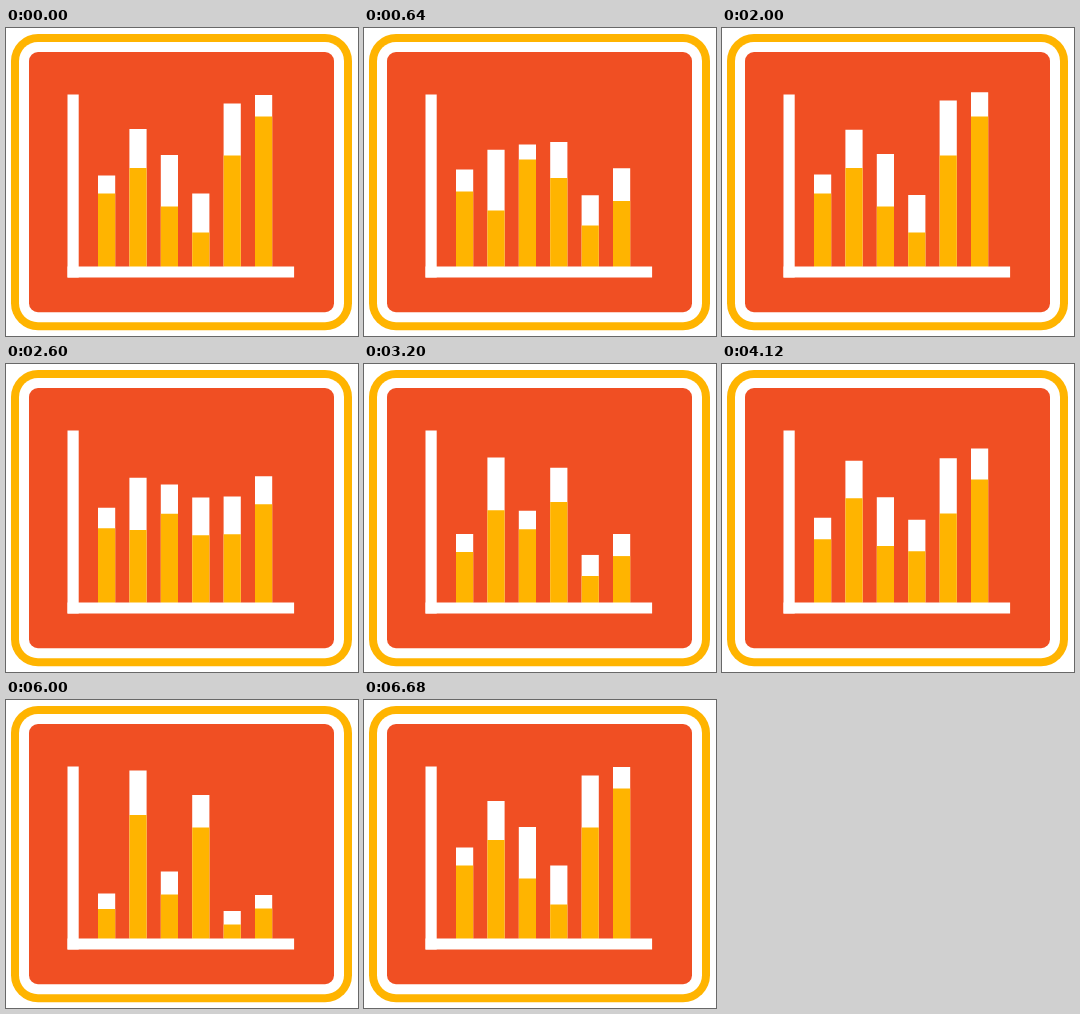
An HTML page with a canvas that plays this animation: 352 px wide and 308 px high, repeating every 6720 ms.

```html
<!DOCTYPE html>
<html lang="en">
<head>
<meta charset="utf-8">
<title>Bar chart</title>
<style>
html, body { margin: 0; width: 100%; height: 100%; overflow: hidden; background: #fff; }
canvas { display: block; }
</style>
</head>
<body>
<canvas id="stage" width="352" height="308"></canvas>
<script>
const ctx = document.getElementById('stage').getContext('2d');
const RED = '#f04f23', GOLD = '#ffb400', WHITE = '#fff';
const CYCLE = 2240, FRAME = 40, MOVE = 400, BASE = 238.5;
const BARS = 6, FIRST = 92, STEP = 31.4, WIDTH = 17.2;

// The chart's three poses: bar heights, and when each layer leaves the pose
const poses = [
  { gold: [73, 98.5, 60, 34, 111, 150], goldLeave: 130,
    full: [91, 137.5, 111.5, 73, 163, 171.5], fullLeave: 130 },
  { gold: [75, 56, 107, 88.5, 41, 65.5], goldLeave: 750,
    full: [97, 117, 122, 124, 72, 99], fullLeave: 750 },
  { gold: [29.5, 123.5, 44, 111, 14, 30], goldLeave: 1603,
    full: [45, 168, 67, 143.5, 27.5, 43.5], fullLeave: 1580 }
];
const OVERSHOOT = { gold: 0, full: 0.022 };

const smooth = u => {
  u = Math.min(1, Math.max(0, u));
  return u * u * (3 - 2 * u);
};

// Eased move that may overshoot slightly and then settle
const progress = (u, over) => (1 + over) * smooth(u) - over * smooth((u - 1) * 2);

function height(layer, bar, t) {
  const leave = pose => pose[layer + 'Leave'];
  const i = Math.max(0, poses.findLastIndex(pose => t >= leave(pose)));
  const from = poses[i], to = poses[(i + 1) % poses.length];
  const p = progress((t - leave(from)) / MOVE, OVERSHOOT[layer]);
  return from[layer][bar] + (to[layer][bar] - from[layer][bar]) * p;
}

function rect(color, x, y, w, h, r = 0) {
  ctx.fillStyle = color;
  ctx.beginPath();
  ctx.roundRect(x, y, w, h, r);
  ctx.fill();
}

// Rounded panel, inset from the outer border
const panel = (color, inset) =>
  rect(color, 5 + inset, 6 + inset, 341 - 2 * inset, 296.2 - 2 * inset, 27 - inset);

function draw(now) {
  const t = Math.floor(now / FRAME) * FRAME % CYCLE;
  rect(WHITE, 0, 0, 352, 308);
  panel(GOLD, 0);
  panel(WHITE, 8);
  panel(RED, 18);
  for (let i = 0; i < BARS; i++) {
    const x = FIRST + i * STEP;
    const full = height('full', i, t), gold = height('gold', i, t);
    rect(WHITE, x, BASE - full, WIDTH, full);
    rect(GOLD, x, BASE - gold, WIDTH, gold + 0.5);
  }
  rect(WHITE, 61.5, 66.6, 11.2, 183);
  rect(WHITE, 61.5, BASE, 226.6, 11.1);
}

const begin = performance.now();
function tick() {
  draw(performance.now() - begin);
  requestAnimationFrame(tick);
}
tick();
</script>
</body>
</html>
```
